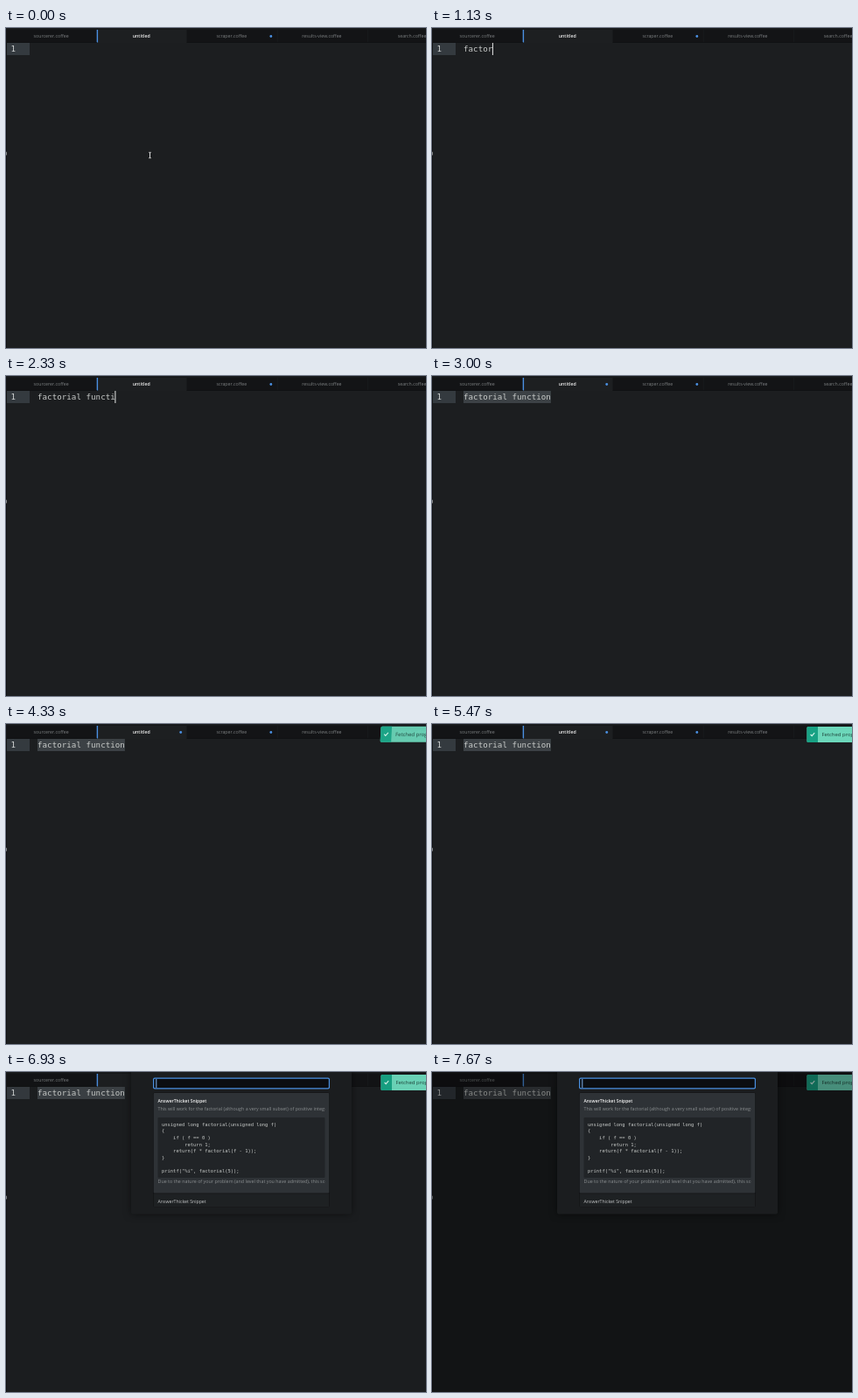
An HTML page with a canvas that plays this animation: 480x366 px, repeating every 8000 ms.

```html
<!DOCTYPE html>
<html lang="en">
<head>
<meta charset="utf-8">
<title>Snippet search</title>
<style>
html, body { margin: 0; width: 100%; height: 100%; overflow: hidden; background: #1c1e20; }
canvas { display: block; }
</style>
</head>
<body>
<canvas id="stage" width="480" height="366"></canvas>
<script>
const ctx = document.getElementById('stage').getContext('2d');
const SANS = '"Open Sans", "Noto Sans", sans-serif';
const MONO = '"DejaVu Sans Mono", "Noto Sans Mono", monospace';
const LOOP = 8000, CHAR = 5.55, CODE_SIZE = 9.22, CODE_X = 36;
const BLUE = '#4a90e2', INK = '#c9ccca';

const PHRASE = 'factorial function';
// when each letter of the phrase is typed
const KEYS = [400, 530, 670, 930, 1000, 1130, 1200, 1330, 1470,
  1600, 1730, 1870, 2000, 2070, 2270, 2330, 2400, 2530];

const SNIPPET = [
  'unsigned long factorial(unsigned long f)',
  '{',
  '    if ( f == 0 )',
  '        return 1;',
  '    return(f * factorial(f - 1));',
  '}',
  '',
  'printf("%i", factorial(5));'
];

function rect(x, y, w, h, color, radius = 0) {
  ctx.fillStyle = color;
  ctx.beginPath();
  ctx.roundRect(x, y, w, h, radius);
  ctx.fill();
}

// Laid out at ten times the size so that small glyph advances stay fractional.
function text(str, x, y, size, color, { font = SANS, weight = 400, align = 'left' } = {}) {
  ctx.save();
  ctx.translate(x, y);
  ctx.scale(0.1, 0.1);
  ctx.font = `${weight} ${size * 10}px ${font}`;
  ctx.textAlign = align;
  ctx.fillStyle = color;
  ctx.fillText(str, 0, 0);
  ctx.restore();
}

const mono = (str, x, y, size, color, opts) => text(str, x, y, size, color, { font: MONO, ...opts });

function line(points, color, width) {
  ctx.strokeStyle = color;
  ctx.lineWidth = width;
  ctx.beginPath();
  points.forEach(([x, y]) => ctx.lineTo(x, y));
  ctx.stroke();
}

function clipped(x, y, w, h, draw) {
  ctx.save();
  ctx.beginPath();
  ctx.rect(x, y, w, h);
  ctx.clip();
  draw();
  ctx.restore();
}

function dot(x) {
  ctx.fillStyle = BLUE;
  ctx.beginPath();
  ctx.arc(x, 9.5, 1.4, 0, 7);
  ctx.fill();
}

function drawTabs(t) {
  rect(0, 0, 480, 16.5, '#131416');
  rect(0, 0, 480, 1.5, '#1a1c1e');
  const names = ['sourcerer.coffee', 'untitled', 'scraper.coffee', 'results-view.coffee', 'search.coffee'];
  names.forEach((name, i) => {
    const x = 1 + i * 103.1, active = i === 1;
    if (active) {
      rect(x, 2, 102.5, 15, '#1d1f21');
      rect(x - 0.4, 2, 1.4, 14.5, BLUE);
    } else {
      rect(x + 102.6, 2, 0.6, 14, '#1d1f21');
    }
    text(name, x + 50.6, 11, 5.25, active ? '#f0f0f0' : '#7c7f81',
      { align: 'center', weight: active ? 600 : 400 });
  });
  rect(0, 16, 104, 0.8, '#0e0f10');
  rect(206.5, 16, 274, 0.8, '#0e0f10');
  dot(302.8);
  if (t >= 2800) dot(199.7);
}

function drawEditor(t) {
  rect(0, 0, 480, 366, '#1c1e20');
  drawTabs(t);
  rect(0, 17, 27, 14, '#343a3f');
  mono('1', 5.6, 27, CODE_SIZE, '#d0d3d3');
  rect(0, 17, 1, 349, '#101112');
  rect(0, 141.5, 1, 4, '#85888a', 1);

  const typed = KEYS.filter(k => t >= k).length;
  const end = CODE_X + PHRASE.length * CHAR;
  if (t >= 2930) {
    const start = t >= 3000 ? CODE_X : CODE_X + 10 * CHAR;
    rect(start, 17, end - start, 14, '#3c4145');
  }
  mono(PHRASE.slice(0, typed), CODE_X, 27, CODE_SIZE, INK);
  if (t >= 130 && t < 2930) rect(CODE_X + typed * CHAR - 0.4, 17, 1, 14, '#e8e8e8');

  if (t < 400) {
    line([[164.5, 142.5], [164.5, 148.5]], '#d8d8d8', 1);
    line([[163, 142.3], [166, 142.3]], '#d8d8d8', 0.8);
    line([[163, 148.7], [166, 148.7]], '#d8d8d8', 0.8);
  }
}

function drawSuggestion(row, word, note, bold, warm) {
  const y = 31 + row * 18.5, mid = y + 9;
  if (row === 0) rect(66, y, 110, 18.5, '#2f3438', [2, 2, 0, 0]);
  rect(66, y, 18.5, 18.5, warm ? '#544a3c' : '#3c473f');
  const color = warm ? '#d9a05f' : '#74b8a0';
  line([[71, mid], [76.5, mid]], color, 1.5);
  line([[74.5, mid - 2.4], [77, mid], [74.5, mid + 2.4]], color, 1.4);
  line([[79, mid - 3], [79, mid + 3]], color, 1.4);
  mono(word.slice(0, bold), 91, mid + 3, CODE_SIZE, '#ffffff', { weight: 700 });
  mono(word.slice(bold), 91 + bold * CHAR, mid + 3, CODE_SIZE, '#c4c7c6');
  mono(note, 171.6, mid + 3, 8.4, '#868a8b', { align: 'right' });
}

function drawSuggestions(t) {
  if (t < 1870 || t >= 2330) return;
  const all = t < 1930;
  rect(66, 31, 110.5, all ? 56 : 19, '#212427', 2);
  if (all) {
    drawSuggestion(0, 'for', 'For Loop', 1, true);
    drawSuggestion(1, 'func', 'any funct…', 1);
    drawSuggestion(2, 'fprintf', 'fprintf', 1);
  } else {
    drawSuggestion(0, 'func', 'any funct…', t < 2000 ? 2 : t < 2070 ? 3 : 4);
  }
}

function drawNotice(t) {
  if (t < 4330) return;
  // tips slightly past upright before it settles
  const tip = Math.max(0, 1 - Math.floor((t - 4330) / 67) / 3);
  ctx.save();
  ctx.globalAlpha = 1 - 0.06 * tip;
  ctx.transform(1, 0, -0.05 * tip, 1, 0.2 * tip, -0.3 * tip);
  rect(428.5, 3, 60, 18, '#6cd7ba', 1.5);
  rect(428.5, 3, 12.5, 18, '#18a284', [1.5, 0, 0, 1.5]);
  line([[432.6, 12], [434.2, 13.7], [437.2, 10.2]], '#d9f5ec', 1.1);
  text('Fetched prog', 445.5, 14, 5.95, '#1d4038');
  ctx.restore();
}

function drawPanel(t) {
  ctx.save();
  ctx.shadowColor = 'rgba(0,0,0,.5)';
  ctx.shadowBlur = 8;
  rect(143, -4, 252, 166.5, '#1b1d1f', 2);
  ctx.restore();

  rect(168, 6.5, 202, 13, BLUE, 2);
  rect(169.2, 7.7, 199.6, 10.6, '#0b0d11', 1);
  if (t < 7270 || t >= 7670) rect(171.3, 8, 1, 10, '#7fb2ee');
  if (t < 6800) return;

  rect(168, 23.5, 202, 131, '#121315', 2);
  rect(168.7, 24, 200.6, 114.5, '#2e3236', 1);
  rect(168.7, 139.2, 200.6, 15, '#1e2123');
  rect(173.5, 52, 191, 69, '#212427', 1);
  text('AnswerThicket Snippet', 173.5, 34.6, 5.05, '#f4f4f4', { weight: 600 });
  clipped(173, 36, 191.3, 94, () => {
    text('This will work for the factorial (although a very small subset) of positive integers',
      173.5, 43.8, 5.36, '#8b8f91');
    text('Due to the nature of your problem (and level that you have admitted), this solution',
      173.5, 127, 5.36, '#8b8f91');
  });
  SNIPPET.forEach((code, i) => mono(code, 178, 61.9 + i * 7.57, 5.45, '#c8cbc9'));
  text('AnswerThicket Snippet', 173.5, 149.6, 5.2, '#c4c6c7');
}

function frame() {
  const t = performance.now() % LOOP;
  drawEditor(t);
  drawSuggestions(t);
  drawNotice(t);
  if (t >= 6730) {
    const fade = Math.min(1, (t - 6730) / 540);
    rect(0, 0, 480, 366, `rgba(0,0,0,${0.34 * fade ** 2.5})`);
    drawPanel(t);
  }
  requestAnimationFrame(frame);
}
frame();
</script>
</body>
</html>
```
